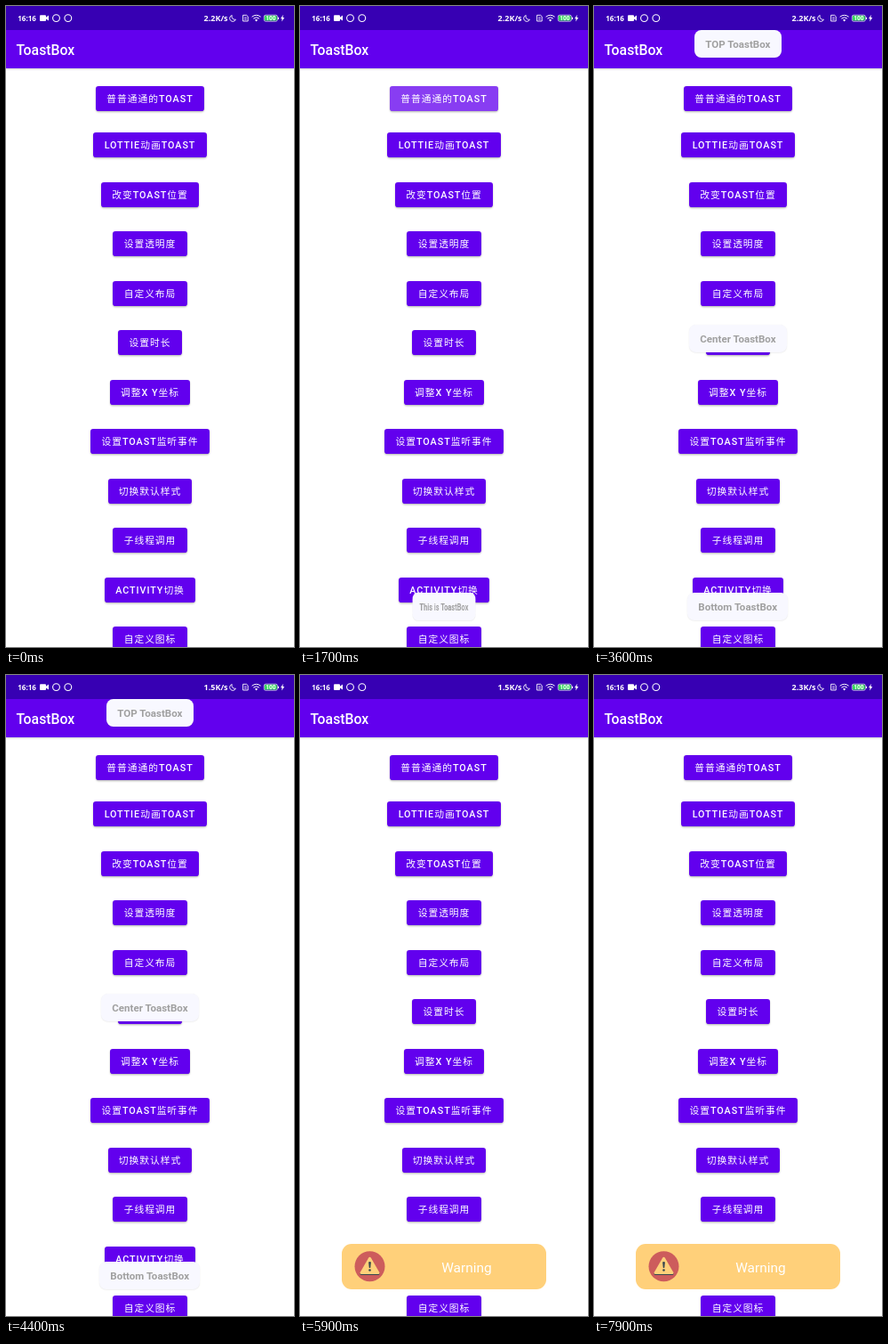
An HTML page that plays this animation: 324 by 720 pixels, repeating every 8 s.

```html
<!DOCTYPE html>
<html lang="zh-CN">
<head>
<meta charset="utf-8">
<title>ToastBox</title>
<style>
html, body { margin: 0; width: 100%; height: 100%; overflow: hidden; }
body { position: relative; background: #fff; font-family: Roboto, "Noto Sans CJK SC", sans-serif; }
.status, .bar, .btn, .toast, .warn { position: absolute; white-space: nowrap; }
.status { left: 0; top: 0; width: 324px; height: 27px; background: #3700b3; }
.bar {
  left: 0; top: 27px; width: 312.4px; height: 43px; padding-left: 11.6px;
  background: #6200ee; color: #fff; font: 500 15.8px/45px Roboto, sans-serif;
  box-shadow: 0 1px 2px rgba(0,0,0,.2); clip-path: inset(0 0 -4px);
}
.status text { fill: #fff; font: 600 8px "Noto Sans", sans-serif; }
.status .speed { font-size: 9px; text-anchor: end; visibility: hidden; }
.status .pct { font: 700 6.4px Roboto, sans-serif; text-anchor: middle; }

.btn, .toast { left: 0; right: 0; width: max-content; margin: 0 auto; padding: 0 12.3px; }
.btn {
  height: 28px; border-radius: 3.1px; overflow: hidden; background: #6200ee; color: #fff;
  box-shadow: 0 1.2px 2px rgba(0,0,0,.28);
  font-size: 10.78px; line-height: 30px; letter-spacing: .0893em;
}
.btn b { font-weight: 500; }
.btn::after { content: ""; position: absolute; inset: 0; background: #fff; opacity: 0; }
.tap::after { animation: tap 8s linear infinite; animation-delay: var(--wait, 0s); }

.toast {
  height: 31px; border-radius: 7.7px;
  background: #f8f8ff; color: #a0a0a0; font: 700 11.55px/32px Roboto, sans-serif;
  box-shadow: 0 .5px 1.5px rgba(0,0,0,.1);
}
.warn {
  left: 47px; top: 639px; width: 230px; height: 51px; border-radius: 11px; background: #ffd07a;
}
.warn text { fill: #fff; font: 400 15.4px Roboto, sans-serif; text-anchor: middle; }

.toast, .warn { transform: scaleX(0); animation: 8s cubic-bezier(.37,0,.63,1) infinite; }
.hello { animation-name: hello; }
.trio { animation-name: trio; }
.warn { animation-name: warn; }
@keyframes hello {
  0%, 19.04% { transform: scaleX(0); }
  22.79%, 38.75% { transform: none; }
  40.6%, 100% { transform: scaleX(0); }
}
@keyframes trio {
  0%, 40.6% { transform: scaleX(0); }
  44.35%, 65.6% { transform: none; }
  68.8%, 100% { transform: scaleX(0); }
}
@keyframes warn {
  0%, 69.4% { transform: scaleX(0); }
  73.15%, 100% { transform: none; }
}
@keyframes tap {
  0%, 16.9% { opacity: 0; }
  18.1%, 21.5% { opacity: .24; }
  23.25%, 100% { opacity: 0; }
}
.s1 { animation: s1 8s step-end infinite; }
.s2 { animation: s2 8s step-end infinite; }
.s3 { animation: s3 8s step-end infinite; }
@keyframes s1 { 0% { visibility: visible; } 52.5%, 100% { visibility: hidden; } }
@keyframes s2 { 0% { visibility: hidden; } 52.5% { visibility: visible; } 90%, 100% { visibility: hidden; } }
@keyframes s3 { 0% { visibility: hidden; } 90%, 100% { visibility: visible; } }
</style>
</head>
<body>
<svg class="status" viewBox="0 0 324 27">
  <text x="13.3" y="16.8">16:16</text>
  <g fill="#fff">
    <rect x="38" y="10.2" width="7" height="6.8" rx="1"/>
    <path d="M44.6 13 48 10.6V16.6L44.6 14.2Z"/>
  </g>
  <g fill="none" stroke="#fff">
    <circle cx="56.5" cy="13.6" r="3.9" stroke-width="1.1"/>
    <circle cx="69.8" cy="13.6" r="3.9" stroke-width="1.1"/>
    <path d="M254.2 10.5A3.5 3.5 0 1 0 258.4 15.2A3.6 3.6 0 0 1 254.2 10.5Z" stroke-width=".9"/>
    <path d="M266.6 10.3H270.6L272.2 11.8V17H266.6ZM268.2 13H270.6M268.2 15H270.6" stroke-width=".9"/>
    <path d="M276.6 12.2Q281.6 8.4 286.6 12.2M278.3 14.1Q281.6 11.6 284.9 14.1" stroke-width="1"/>
    <rect x="290.3" y="10.2" width="15" height="7" rx="1.8" stroke-width=".7"/>
  </g>
  <path d="M279.9 15.6Q281.6 14.3 283.3 15.6L281.6 17.5Z" fill="#fff"/>
  <rect x="290.9" y="10.8" width="13.8" height="5.8" rx="1.3" fill="#35d85c"/>
  <rect x="306" y="12.4" width="1" height="2.6" rx=".5" fill="#fff"/>
  <text class="pct" x="297.8" y="16">100</text>
  <path d="M311.8 9.8 309 14.2H310.6L310.2 17.6 313.2 13H311.4Z" fill="#fff"/>
  <text class="speed s1" x="249.6" y="16.9">2.2K/s</text>
  <text class="speed s2" x="249.6" y="16.9">1.5K/s</text>
  <text class="speed s3" x="249.6" y="16.9">2.3K/s</text>
</svg>
<div class="bar">ToastBox</div>

<div id="list"></div>

<div class="toast hello" style="top:659px">This is ToastBox</div>
<div class="toast trio" style="top:27px">TOP ToastBox</div>
<div class="toast trio" style="top:358px">Center ToastBox</div>
<div class="toast trio" style="top:659px">Bottom ToastBox</div>
<svg class="warn" viewBox="0 0 230 51">
  <circle cx="31.5" cy="25.3" r="17" fill="#cd5c5c"/>
  <path d="M31.5 16.6 41.2 33.6H21.8Z" fill="#37474f" stroke="#37474f" stroke-width="2.6" stroke-linejoin="round"/>
  <path d="M31.5 16 41.2 32.6H21.8Z" fill="#ffd07a" stroke="#ffd07a" stroke-width="2.6" stroke-linejoin="round"/>
  <path d="M30.1 20.4Q31.5 19.4 32.9 20.4L32.2 27H30.8Z" fill="#37474f"/>
  <circle cx="31.5" cy="29.5" r="1.3" fill="#37474f"/>
  <text x="140.4" y="32">Warning</text>
</svg>

<script>
const labels = ["普普通通的TOAST", "LOTTIE动画TOAST", "改变TOAST位置", "设置透明度", "自定义布局", "设置时长",
  "调整X Y坐标", "设置TOAST监听事件", "切换默认样式", "子线程调用", "ACTIVITY切换", "自定义图标"];
// index of each tapped button and its offset from the first tap
const taps = { 0: 0, 2: 1.727, 4: 4.03 };
document.getElementById("list").innerHTML = labels.map((label, i) => {
  const top = i ? Math.round(86.6 + 55.5 * i) : 90;
  const tap = i in taps;
  const wait = tap ? `;--wait:${taps[i]}s` : "";
  const text = label.replace(/[A-Z][A-Z ]*/g, "<b>$&</b>");
  return `<div class="btn${tap ? " tap" : ""}" style="top:${top}px${wait}">${text}</div>`;
}).join("");
</script>
</body>
</html>
```
